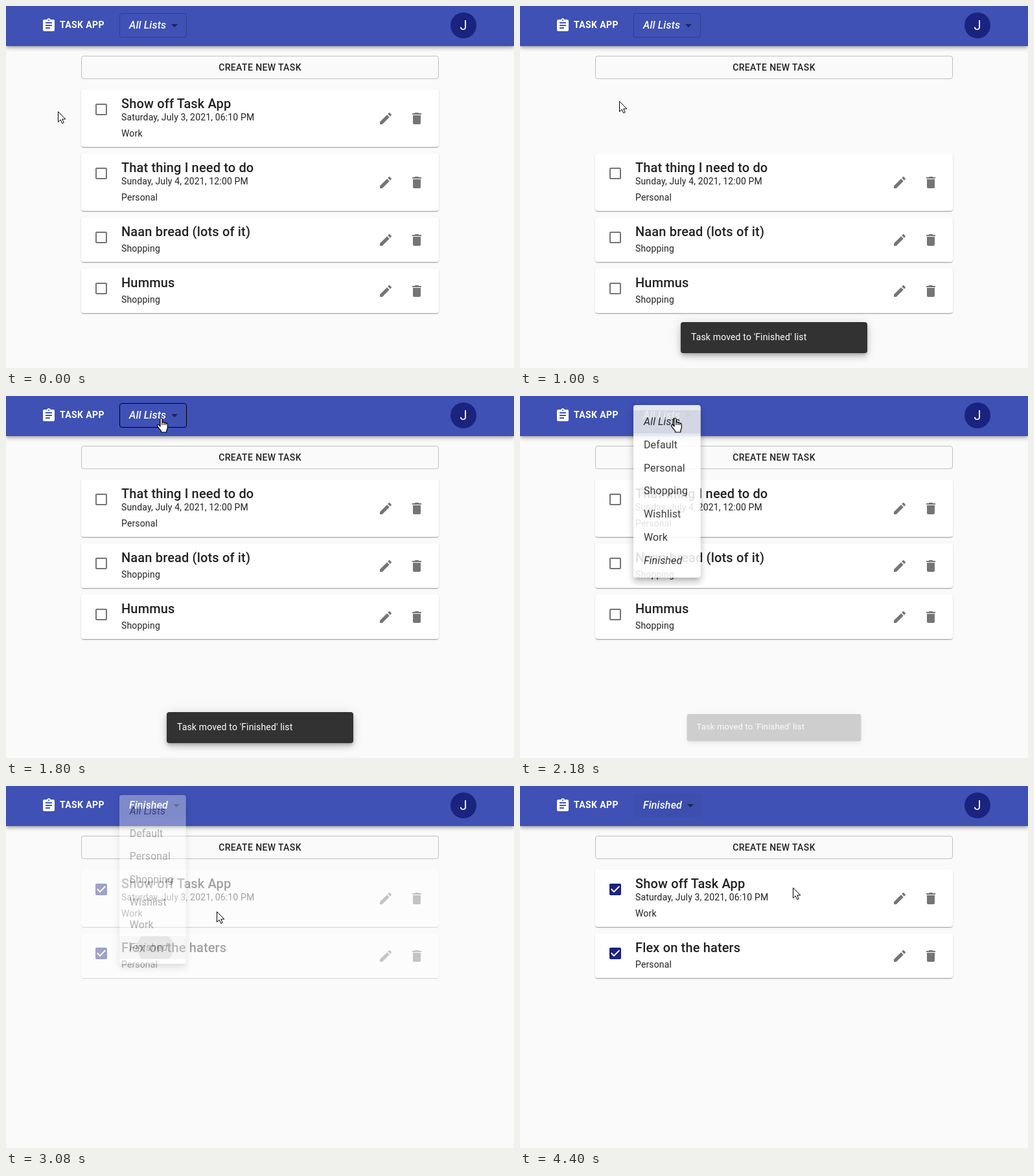
Write an HTML page that moves like this. It is 784x560 px and loops after 4780 ms.

```html
<!DOCTYPE html>
<html lang="en">
<head>
<meta charset="utf-8">
<title>Task App</title>
<style>
html, body { margin: 0; width: 100%; height: 100%; overflow: hidden; }
body { position: relative; background: #fafafa; color: rgba(0,0,0,.87); font: 14px/20px Roboto, sans-serif; letter-spacing: .15px; }
body > *, header > *, .card > *, #select svg { position: absolute; box-sizing: border-box; white-space: nowrap; }
svg { width: 24px; height: 24px; fill: currentColor; overflow: visible; }
header { left: 0; top: 0; width: 784px; height: 62px; background: #3f51b5; color: #fff;
  box-shadow: 0 2px 4px -1px rgba(0,0,0,.2), 0 4px 5px rgba(0,0,0,.14), 0 1px 10px rgba(0,0,0,.12); }
header svg { left: 54px; top: 18px; }
#brand { left: 83px; top: 19px; font-weight: 700; letter-spacing: .4px; }
#select { left: 175px; top: 11px; height: 38px; border: 1px solid; border-radius: 4px; padding-left: 14px; font: italic 500 16px/36px Roboto, sans-serif; }
#select svg { left: auto; right: 6px; top: 6px; color: rgba(0,0,0,.54); }
#avatar { left: 686px; top: 10px; width: 40px; height: 40px; border-radius: 50%; background: #1a237e; font-size: 20px; line-height: 40px; text-align: center; }
#create { left: 116px; top: 77px; width: 552px; height: 36px; border: 1px solid rgba(0,0,0,.23); border-radius: 4px; font-weight: 500; line-height: 34px; letter-spacing: .4px; text-align: center; }
.list { left: 116px; top: 129px; width: 552px; }
.card { position: relative; height: 69px; margin-bottom: 10px; border-radius: 4px; background: #fff;
  box-shadow: 0 2px 1px -1px rgba(0,0,0,.2), 0 1px 1px rgba(0,0,0,.14), 0 1px 3px rgba(0,0,0,.12); }
.card.dated { height: 89px; }
.card svg { color: rgba(0,0,0,.54); top: calc(50% - 11.5px); }
.card .box { left: 19px; top: 19px; }
.card .box.on { color: #1a237e; }
.edit { left: 458px; }
.bin { left: 506px; }
.info { left: 62px; top: 10px; }
.info b { display: block; font-size: 20px; font-weight: 500; line-height: 24px; }
.date { margin-top: -1px; padding-bottom: 1px; }
.tag { margin-top: 4px; }
#snack { left: 248px; top: 489px; width: 288px; height: 48px; padding-left: 16px; border-radius: 4px; background: #323232; color: #fff; line-height: 47px;
  box-shadow: 0 3px 5px -1px rgba(0,0,0,.2), 0 6px 10px rgba(0,0,0,.14), 0 1px 18px rgba(0,0,0,.12); }
#menu { left: 175px; top: 14px; width: 104px; height: 268px; padding: 8px 0; border-radius: 4px; background: #fff; transform-origin: 0 0; font-size: 16px; line-height: 36px;
  box-shadow: 0 5px 5px -3px rgba(0,0,0,.2), 0 8px 10px 1px rgba(0,0,0,.14), 0 3px 14px 2px rgba(0,0,0,.12); }
#menu div { position: relative; height: 36px; padding-left: 16px; overflow: hidden; }
#menu div:first-child, #menu div:last-child { font-style: italic; }
#ripple { position: absolute; left: 28px; top: -10px; width: 56px; height: 56px; border-radius: 50%; background: rgba(0,0,0,.2); }
#cursor { left: 0; top: 0; fill: #fff; stroke: #000; stroke-linejoin: round; }
</style>
</head>
<body>
<div id="create">CREATE NEW TASK</div>
<div class="list" id="open"></div>
<div class="list" id="done"></div>
<header>
  <svg><path d="M19 3h-4.18C14.4 1.84 13.3 1 12 1s-2.4.84-2.82 2H5c-1.1 0-2 .9-2 2v14c0 1.1.9 2 2 2h14c1.1 0 2-.9 2-2V5c0-1.1-.9-2-2-2zm-7 0c.55 0 1 .45 1 1s-.45 1-1 1-1-.45-1-1 .45-1 1-1zm2 14H7v-2h7v2zm3-4H7v-2h10v2zm0-4H7V7h10v2z"/></svg>
  <div id="brand">TASK APP</div>
  <div id="select"><span id="chosen"></span><svg><path d="M7 10l5 5 5-5z"/></svg></div>
  <div id="avatar">J</div>
</header>
<div id="snack">Task moved to 'Finished' list</div>
<div id="menu"></div>
<svg id="cursor">
  <path id="arrow" d="M.5 .5V16.5L4.2 13 6.7 18.6 9.2 17.5 6.8 12H11.8Z"/>
  <path id="hand" transform="translate(-6.5 -1)" stroke-width="1.2" d="M5.5 2.5C5.5.5 8.5.5 8.5 2.5V8.5C8.5 7 11.5 7 11.5 9 11.5 7.7 14.2 7.8 14.2 9.8 14.2 8.7 16.8 8.8 16.8 11V16C16.8 18 15.2 19.5 15.2 21.5V23H7V21.2C5 19 3.2 16.5 1 13.5 .2 11.8 2.2 10.8 3.5 12L5.5 14ZM8.5 8.5V12M11.5 9V12M14.2 9.8V12M5.5 14V11"/>
</svg>
<script>
const $ = id => document.getElementById(id);
const LOOP = 4780;
const icons = {
  off: 'M19 5v14H5V5h14m0-2H5c-1.1 0-2 .9-2 2v14c0 1.1.9 2 2 2h14c1.1 0 2-.9 2-2V5c0-1.1-.9-2-2-2z',
  on: 'M19 3H5c-1.11 0-2 .9-2 2v14c0 1.1.89 2 2 2h14c1.11 0 2-.9 2-2V5c0-1.1-.89-2-2-2zm-9 14l-5-5 1.41-1.41L10 14.17l7.59-7.59L19 8l-9 9z',
  edit: 'M3 17.25V21h3.75L17.81 9.94l-3.75-3.75L3 17.25zM20.71 7.04c.39-.39.39-1.02 0-1.41l-2.34-2.34c-.39-.39-1.02-.39-1.41 0l-1.83 1.83 3.75 3.75 1.83-1.83z',
  bin: 'M6 19c0 1.1.9 2 2 2h8c1.1 0 2-.9 2-2V7H6v12zM19 4h-3.5l-1-1h-5l-1 1H5v2h14V4z'
};
const icon = (name, cls = name) => `<svg class="${cls}"><path d="${icons[name]}"/></svg>`;
const card = (state, title, tag, date) => `<div class="card${date ? ' dated' : ''}">${icon(state, 'box ' + state)}
  <div class="info"><b>${title}</b>${date ? `<div class="date">${date}</div>` : ''}<div class="tag">${tag}</div></div>
  ${icon('edit')}${icon('bin')}</div>`;

const demo = ['Show off Task App', 'Work', 'Saturday, July 3, 2021, 06:10 PM'];
$('open').innerHTML = card('off', ...demo) +
  card('off', 'That thing I need to do', 'Personal', 'Sunday, July 4, 2021, 12:00 PM') +
  card('off', 'Naan bread (lots of it)', 'Shopping') + card('off', 'Hummus', 'Shopping');
$('done').innerHTML = card('on', ...demo) + card('on', 'Flex on the haters', 'Personal');
$('menu').innerHTML = ['All Lists', 'Default', 'Personal', 'Shopping', 'Wishlist', 'Work', 'Finished']
  .map(s => `<div>${s}</div>`).join('');
const items = [...$('menu').children];
items[6].insertAdjacentHTML('beforeend', '<i id="ripple"></i>');
const first = $('open').firstChild, box = first.querySelector('.box');

const clamp = x => Math.min(1, Math.max(0, x));
// cubic-bezier(.4, 0, .2, 1)
function ease(x) {
  x = clamp(x);
  let lo = 0, hi = 1, s = .5;
  for (let i = 0; i < 20; i++) {
    s = (lo + hi) / 2;
    const u = 1 - s;
    if (1.2 * u * u * s + .6 * u * s * s + s * s * s < x) lo = s; else hi = s;
  }
  return s * s * (3 - 2 * s);
}
const ramp = (t, start, length) => ease((t - start) / length);

// Grow in at `start`, shrink and fade away at `end`
function grow(el, t, start, inMs, end, outMs) {
  const p = (t - start) / inMs, q = (t - end) / outMs;
  const s = .75 + .25 * ease(p * 1.5) - .25 * ease((q - .333) * 1.5);
  el.style.opacity = ease(p) - ease(q);
  el.style.transform = s > .9999 ? 'none' : `scale(${s}, ${s * s})`;
  el.style.display = p > 0 && q < 1 ? '' : 'none';
}

// time, x, y of the pointer
const path = [[0, 80, 163], [100, 80, 163], [330, 112, 158], [590, 143, 159], [900, 143, 159], [1000, 153, 147],
  [1180, 186, 106], [1400, 222, 60], [1590, 239, 34], [2220, 239, 34], [2450, 238, 130], [2700, 235, 254],
  [2950, 235, 254], [3080, 325, 194], [3300, 398, 168], [3520, 423, 159], [3600, 423, 159], [3710, 421, 157], [LOOP, 421, 157]];
const handTimes = [[470, 960], [1165, 1320], [1460, 2985]];

function pointer(t) {
  const i = path.findIndex(p => p[0] > t), [t0, x0, y0] = path[i - 1], [t1, x1, y1] = path[i];
  const k = (t - t0) / (t1 - t0);
  return [x0 + (x1 - x0) * k, y0 + (y1 - y0) * k].map(Math.round);
}

function draw(t) {
  const [x, y] = pointer(t);
  const hand = handTimes.some(([a, b]) => t >= a && t < b);
  $('cursor').style.transform = `translate(${x}px, ${y}px)`;
  $('hand').style.display = hand ? '' : 'none';
  $('arrow').style.display = hand ? 'none' : '';

  $('create').style.background = `rgba(0,0,0,${.04 * (ramp(t, 1180, 250) - ramp(t, 1320, 250))})`;

  const picked = t >= 2950, select = $('select').style;
  $('chosen').textContent = picked ? 'Finished' : 'All Lists';
  select.width = picked ? '107px' : '104px';
  select.borderColor = t >= 2000 ? '#3f51b5' : t >= 1480 ? '#000' : 'rgba(0,0,0,.23)';
  select.background = t >= 2000 ? 'rgba(0,0,0,.03)' : 'none';
  $('chosen').style.color = '#fff';

  const checked = t >= 690;
  box.setAttribute('class', checked ? 'box on' : 'box');
  box.firstChild.setAttribute('d', checked ? icons.on : icons.off);
  first.style.opacity = 1 - ramp(t, 720, 225);
  first.style.display = t < 1050 ? '' : 'none';
  $('open').style.display = t < 2995 ? '' : 'none';
  $('done').style.display = t < 2995 ? 'none' : '';
  for (const c of $('done').children) c.style.opacity = ramp(t, 2995, 275);

  grow($('snack'), t, 720, 225, 2082, 195);
  grow($('menu'), t, 2003, 303, 2953, 303);
  const over = hand ? Math.floor((y - 22) / 36) : -1;
  items.forEach((el, i) => {
    const tint = i === (picked ? 6 : 0) ? .08 : i === over ? .04 : 0;
    el.style.background = `rgba(0,0,0,${tint})`;
  });
  $('ripple').style.transform = `scale(${ramp(t, 2860, 200)})`;
}

function tick() {
  draw(performance.now() % LOOP);
  requestAnimationFrame(tick);
}
tick();
</script>
</body>
</html>
```
